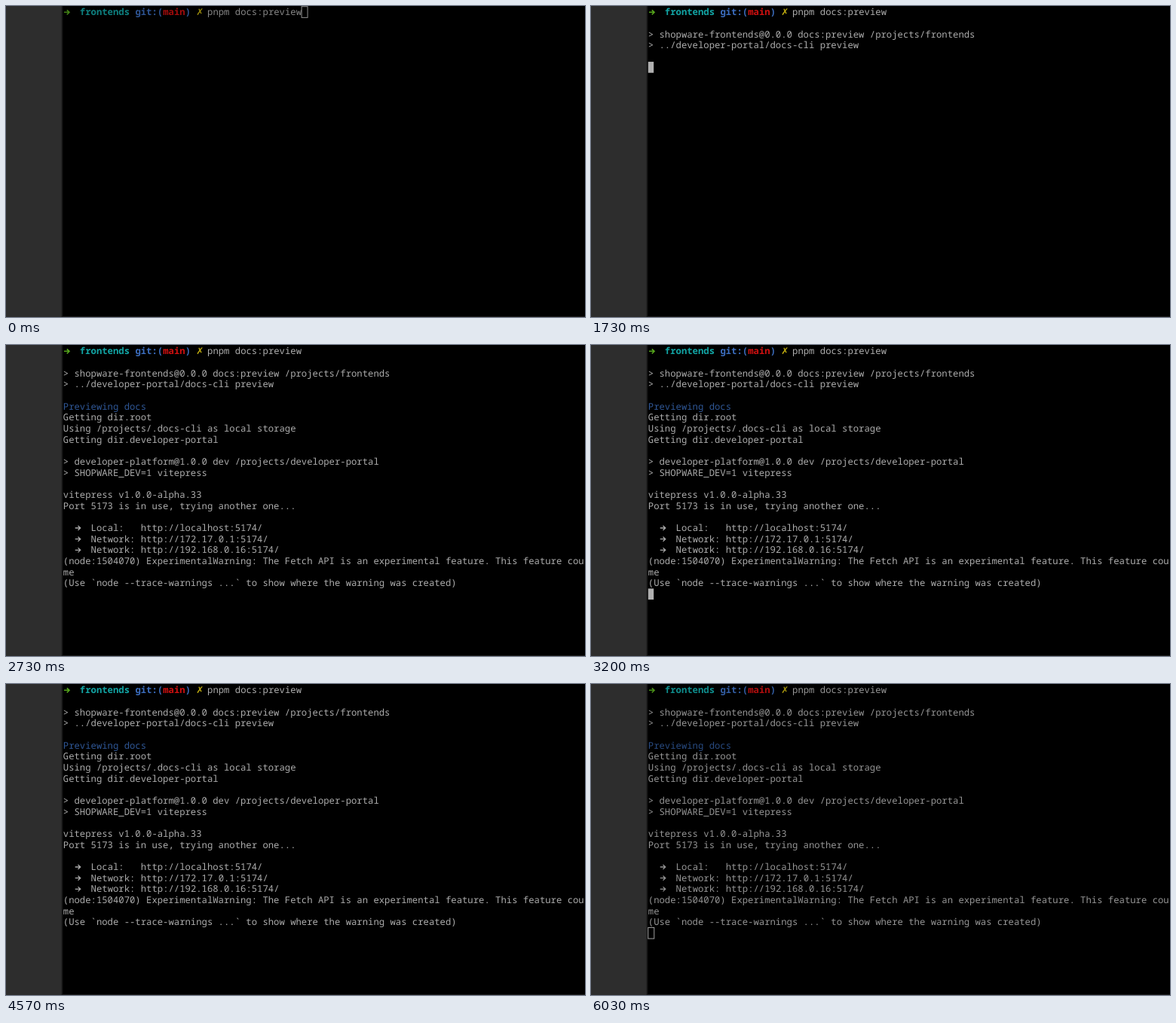
An HTML page that plays this animation: 768 by 413 pixels, repeating every 6060 ms.

```html
<!DOCTYPE html>
<html lang="en">
<head>
<meta charset="utf-8">
<title>Terminal</title>
<style>
  html, body { margin: 0; width: 100%; height: 100%; overflow: hidden; background: #000; }
  svg { display: block; width: 100vw; height: 100vh; }
  text { font-family: "Noto Sans Mono", "DejaVu Sans Mono", monospace; font-size: 12.26px; white-space: pre; text-rendering: geometricPrecision; }
  .bold { font-weight: 700; }
  .sign { font-family: "DejaVu Sans", sans-serif; font-size: 12px; }
</style>
</head>
<body>
<svg id="stage" viewBox="0 0 768 413" preserveAspectRatio="none">
  <defs>
    <linearGradient id="edge">
      <stop offset="0" stop-color="#2d2d2d"/>
      <stop offset="1" stop-color="#000"/>
    </linearGradient>
  </defs>
  <rect width="768" height="413" fill="#000"/>
  <rect width="73" height="413" fill="#2d2d2d"/>
  <rect x="73" width="3" height="413" fill="url(#edge)"/>
  <rect x="75" y="412" width="693" height="1" fill="#1c1c1c"/>
  <g id="screen"></g>
</svg>
<script>
const LOOP = 6060, LEFT = 75.8, TOP = 0.7, CELL = 7.356, LINE = 14.67;
const FOCUS = 730, BLUR = 5970, ENTER = 1570, BLINK = 600;
const INK = '#acacac', GOLD = '#c2ae10', GREEN = '#55a51c', CYAN = '#12a5a5', BLUE = '#3c6ec0', RED = '#d01010', NAVY = '#2f5796';

const screen = document.getElementById('screen');
const colX = col => LEFT + col * CELL;
const rowY = row => TOP + row * LINE;

function add(tag, attrs, parent = screen) {
  const el = document.createElementNS('http://www.w3.org/2000/svg', tag);
  for (const key in attrs) el.setAttribute(key, attrs[key]);
  return parent.appendChild(el);
}

function write(row, col, str, fill = INK, cls = '', parent = screen) {
  add('text', { x: colX(col), y: rowY(row) + 11.6, fill, class: cls }, parent).textContent = str;
}

function arrow(row, col, fill, weight, parent = screen) {
  add('path', {
    d: `M${colX(col) + 1.2} ${rowY(row) + 7.6}h7m-3.2 -3l3.2 3l-3.2 3`,
    fill: 'none', stroke: fill, 'stroke-width': weight
  }, parent);
}

// Shell prompt
arrow(0, 0, GREEN, 1.6);
write(0, 3, 'frontends', CYAN, 'bold');
write(0, 13, 'git:(', BLUE, 'bold');
write(0, 18, 'main', RED, 'bold');
write(0, 22, ')', BLUE, 'bold');
write(0, 24, '✗', GOLD, 'sign bold');
write(0, 26, 'pnpm docs:preview');

// Output blocks: time, first row, lines, row of the cursor afterwards
const blocks = [
  [1730, 2, ['> shopware-frontends@0.0.0 docs:preview /projects/frontends',
    '> ../developer-portal/docs-cli preview'], 5],
  [1890, 5, ['Previewing docs', 'Getting dir.root',
    'Using /projects/.docs-cli as local storage', 'Getting dir.developer-portal'], 9],
  [2330, 10, ['> developer-platform@1.0.0 dev /projects/developer-portal',
    '> SHOPWARE_DEV=1 vitepress'], 13],
  [2530, 13, ['vitepress v1.0.0-alpha.33'], 14],
  [2600, 14, ['Port 5173 is in use, trying another one...'], 15],
  [2640, 16, ['➜Local:   http://localhost:5174/', '➜Network: http://172.17.0.1:5174/',
    '➜Network: http://192.168.0.16:5174/'], 19],
  [2700, 19, ['(node:1504070) ExperimentalWarning: The Fetch API is an experimental feature. This feature cou',
    'me', '(Use `node --trace-warnings ...` to show where the warning was created)'], 22]
].map(([at, first, lines, next]) => {
  const group = add('g', {});
  lines.forEach((str, i) => {
    const row = first + i;
    if (str[0] === '➜') {
      arrow(row, 2, INK, 1.3, group);
      write(row, 5, str.slice(1), INK, '', group);
    } else {
      write(row, 0, str, str === 'Previewing docs' ? NAVY : INK, '', group);
    }
  });
  return { at, group, next };
});

const solid = add('rect', { width: CELL, height: LINE, fill: '#b0b0b0' });
const hollow = add('rect', { width: CELL + 0.6, height: LINE, fill: 'none', stroke: '#b8b8b8', 'stroke-width': 1 });

const clamp = v => Math.max(0, Math.min(1, v));
const show = (el, on) => el.setAttribute('visibility', on ? 'visible' : 'hidden');

function place(el, row, col) {
  el.setAttribute('x', colX(col));
  el.setAttribute('y', rowY(row));
}

function render(t) {
  const focused = t >= FOCUS && t < BLUR;
  const light = clamp((t - FOCUS) / 150) - clamp((t - BLUR + 30) / 150);
  screen.setAttribute('opacity', 0.78 + 0.22 * light);

  let row = t < ENTER ? 0 : 1;
  for (const b of blocks) {
    const on = t >= b.at;
    show(b.group, on);
    if (on) row = b.next;
  }

  // The blink restarts on focus and on the key press
  const since = t - (t < ENTER ? FOCUS : ENTER);
  const lit = Math.floor(since / BLINK) % 2 === 0;
  const col = row ? 0 : 43;
  place(solid, row, col);
  place(hollow, row, col);
  show(solid, focused && lit);
  show(hollow, !focused);
}

function tick() {
  render(performance.now() % LOOP);
  requestAnimationFrame(tick);
}
tick();
</script>
</body>
</html>
```
